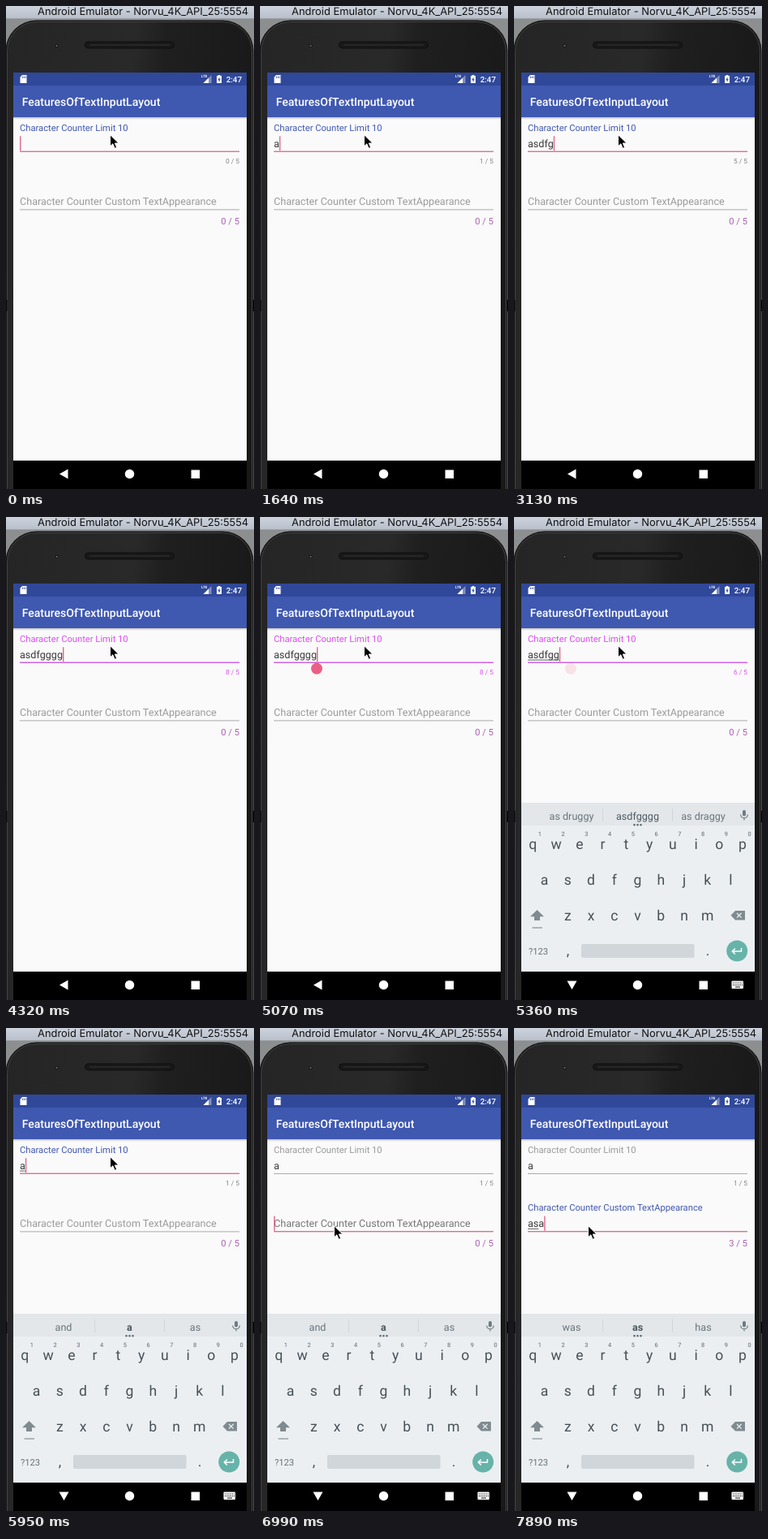
These frames come from a looping animation (306 by 595 pixels, 8 s). An HTML page:

```html
<!DOCTYPE html>
<html lang="en">
<head>
<meta charset="utf-8">
<title>Text input counters</title>
<style>
html, body { margin: 0; width: 100%; height: 100%; overflow: hidden; background: #222; }
svg { display: block; width: 306px; height: 595px; }
text { font-family: Roboto, sans-serif; text-rendering: geometricPrecision; white-space: pre; }
.mid { text-anchor: middle; }
.end { text-anchor: end; }
.body { font-size: 12.6px; fill: #3a3a3a; }
.label { font-size: 11.2px; }
.key { font-size: 17.6px; fill: #465158; }
.digit { font-size: 7.4px; fill: #5a666d; }
.word { font-size: 12.6px; fill: #68757c; }
</style>
</head>
<body>
<svg viewBox="0 0 306 595" xmlns="http://www.w3.org/2000/svg">
  <defs>
    <linearGradient id="bar" x2="0" y2="1"><stop stop-color="#cdd3dd"/><stop offset="1" stop-color="#b9c0cb"/></linearGradient>
    <linearGradient id="shell" x2="1" y2=".25"><stop stop-color="#252525"/><stop offset=".5" stop-color="#292929"/><stop offset=".62" stop-color="#1f1f1f"/><stop offset="1" stop-color="#191919"/></linearGradient>
    <linearGradient id="shade" x2="0" y2="1"><stop stop-color="#000" stop-opacity=".22"/><stop offset="1" stop-color="#000" stop-opacity="0"/></linearGradient>
    <clipPath id="screen"><path d="M9 82H297V595H9Z"/></clipPath>
  </defs>

  <!-- window and phone shell -->
  <path fill="#8c8e8f" d="M0 0H306V595H0Z"/>
  <path fill="url(#bar)" d="M0 0H306V15H0Z"/>
  <path fill="#9da2a8" d="M0 15H306V16H0Z"/>
  <text x="39" y="11" style="font:12.9px Inter,sans-serif" fill="#111">Android Emulator - Norvu_4K_API_25:5554</text>
  <rect x="-.5" y="17.5" width="306" height="640" rx="38" fill="#141414"/>
  <rect x="1.5" y="19.5" width="302" height="640" rx="36" fill="url(#shell)" stroke="#444"/>
  <path fill="#080808" d="M0 362H1.5V376H0ZM304.5 362H306V376H304.5Z"/>
  <rect x="97.5" y="44" width="110" height="8" rx="4" fill="#181818" stroke="#0e0e0e"/>
  <path d="M103 48H202" stroke="#262626" stroke-width="2"/>
  <circle cx="62.5" cy="49" r="2.2" fill="#181818"/><circle cx="62.5" cy="49" r="1" fill="#777"/>

  <g clip-path="url(#screen)">
    <path fill="#fafafa" d="M9 82H297V595H9Z"/>
    <path fill="#3f58b0" d="M9 98H297V137H9Z"/>
    <path fill="#304899" d="M9 82H297V98H9Z"/>
    <path fill="url(#shade)" d="M9 137H297V140H9Z"/>
    <text x="19.7" y="123" font-size="14" font-weight="500" fill="#fff">FeaturesOfTextInputLayout</text>

    <!-- status icons -->
    <path fill="#fff" d="M20 85H25.5V95H17.5V87.7Z"/>
    <path stroke="#304899" d="M20.5 86.5V89M22.3 86.5V89M24.1 86.5V89" stroke-width=".8"/>
    <text x="241" y="88" font-size="4.4" font-weight="700" fill="#fff">LTE</text>
    <path fill="#fff" fill-opacity=".4" d="M253.5 85V95H243.5Z"/>
    <path fill="#fff" d="M250 88.5V95H243.5Z"/>
    <path fill="#fff" d="M260 86H261.7V85H264.3V86H266V95H260Z"/>
    <path fill="#304899" d="M263.5 87.5L261.3 91.3H262.7V93.8L264.8 90.2H263.5Z"/>
    <text class="end" x="291" y="94" font-size="9.8" font-weight="500" fill="#fff">2:47</text>

    <g id="fields"></g>
    <path fill="#000" d="M9 560H297V595H9Z"/>

    <g id="keyboard">
      <path fill="#eceff1" d="M9 352H297V560H9Z"/>
      <path fill="#e3e7ea" d="M9 352H297V380H9Z"/>
      <path stroke="#d0d6d9" d="M109.5 359V375M195.5 359V375"/>
      <g id="words"></g>
      <g id="dots" fill="#59666d"><circle cx="148.5" cy="379.3" r="1.2"/><circle cx="152.5" cy="379.3" r="1.2"/><circle cx="156.5" cy="379.3" r="1.2"/></g>
      <rect x="282" y="361" width="4" height="7.5" rx="2" fill="#707c82"/>
      <path d="M279.7 366.5A4.3 4.3 0 0 0 288.3 366.5M284 371V373.5" fill="none" stroke="#707c82" stroke-width="1.2"/>
      <g id="keys"></g>
      <path fill="#7f8b91" d="M28.5 484L37 492.3H32V497H25V492.3H20Z"/>
      <path stroke="#8d989d" d="M22.5 506H35" stroke-width="1.3"/>
      <path fill="#7f8b91" d="M273 485H285V496.5H273L267.5 490.7Z"/>
      <path stroke="#eceff1" d="M275 488L280.6 493.6M280.6 488L275 493.6" stroke-width="1.3"/>
      <rect x="83" y="526" width="139.5" height="17" rx="2" fill="#d0d6d9"/>
      <circle cx="275.2" cy="534.5" r="13" fill="#67b3a9"/>
      <path fill="none" stroke="#fff" stroke-width="1.5" d="M280.5 531V535H269.5M272.8 531.6L269.3 535L272.8 538.4"/>
    </g>

    <g fill="#fff">
      <path id="back"/>
      <circle cx="152.5" cy="576.5" r="5.7"/>
      <path d="M228.5 571.5H239V582H228.5Z"/>
      <g id="switcher">
        <rect x="268.5" y="571.5" width="14.5" height="9.5" rx="1"/>
        <path stroke="#000" stroke-width="1.2" stroke-dasharray="1.2 1" d="M270 574H282M270 576.5H282"/>
        <path stroke="#000" d="M273 579H279"/>
      </g>
    </g>
  </g>
  <path id="mouse" fill="#000" stroke="#fff" stroke-width="1" stroke-linejoin="round"
        d="M.5 .5V14.5L3.8 11.5L6.2 17L8.7 16L6.3 10.7H11Z"/>
</svg>

<script>
const LOOP = 8000;
const ACCENT = '#e3678a', BLUE = '#4158b2', OVER = '#db50ef', GRAY = '#9b9b9b', PURPLE = '#a964b1';
const LEFT = 17, RIGHT = 288, LIMIT = 5;
const $ = id => document.getElementById(id);

function add(parent, tag, attrs, content = '') {
  const el = document.createElementNS('http://www.w3.org/2000/svg', tag);
  set(el, attrs);
  el.textContent = content;
  return parent.appendChild(el);
}
function set(el, attrs) {
  for (const name in attrs) el.setAttribute(name, attrs[name]);
}
const show = (el, on) => set(el, { visibility: on ? 'visible' : 'hidden' });

function makeField(hint, base, lineY, countY, countSize) {
  const root = $('fields');
  return {
    base, lineY,
    label: add(root, 'text', { class: 'label', x: LEFT }, hint),
    line: add(root, 'rect', { x: LEFT, width: RIGHT - LEFT }),
    count: add(root, 'text', { class: 'end', x: RIGHT, y: countY, 'font-size': countSize }),
    value: add(root, 'text', { class: 'body', x: LEFT, y: base }),
    mark: add(root, 'rect', { x: LEFT, y: base + 1.8, height: 1, fill: '#666' }),
    caret: add(root, 'rect', { y: base - 13.5, width: 1.4, height: 18, fill: ACCENT })
  };
}
const first = makeField('Character Counter Limit 10', 173.8, 179, 193.6, 8.4);
const second = makeField('Character Counter Custom TextAppearance', 245.2, 250.4, 269, 11.2);
const handle = add($('fields'), 'path', { fill: '#ea5f85', d: 'M0 0L5 3A7 7 0 1 1 -5 3Z' });

// keyboard letters
const keys = $('keys');
[['qwertyuiop', 23.3, 408.8], ['asdfghjkl', 37.5, 452.8], ['zxcvbnm', 66.3, 496.8]].forEach(([row, x0, y], r) =>
  [...row].forEach((ch, i) => {
    const x = x0 + i * 28.75;
    add(keys, 'text', { class: 'key mid', x, y }, ch);
    if (!r) add(keys, 'text', { class: 'digit mid', x: x + 8.6, y: 393 }, (i + 1) % 10);
  }));
add(keys, 'text', { class: 'mid', x: 30, y: 538.5, 'font-size': 11.2, fill: '#66737a' }, '?123');
add(keys, 'text', { class: 'key mid', x: 66.5, y: 540 }, ',');
add(keys, 'text', { class: 'key mid', x: 239, y: 540 }, '.');
const words = [71, 152.5, 233.5].map(x => add($('words'), 'text', { class: 'word mid', x, y: 372.6 }));
words[1].style.fill = '#4c5960';

// each step changes only the listed parts of the state
const start = {
  a: '', b: '', focus: 1, caret: true, composing: 0, handle: 0,
  keyboard: 0, words: '||', dots: false, lift: 0, mouse: [128, 158.3]
};
const steps = [
  [0, {}],
  [150, { caret: false }],
  [590, { a: 'a', caret: true }],
  [1040, { caret: false }],
  [1640, { caret: true }],
  [2090, { a: 'as' }],
  [2380, { a: 'asd' }],
  [2830, { a: 'asdf' }],
  [3130, { a: 'asdfg' }],
  [3430, { a: 'asdfgg' }],
  [3730, { a: 'asdfggg' }],
  [4180, { a: 'asdfgggg' }],
  [4770, { caret: false }],
  [4920, { caret: true, handle: 1 }],
  [5210, { composing: 8, keyboard: .5 }],
  [5360, { a: 'asdfgg', handle: .15, keyboard: 1, words: 'as druggy|asdfgggg|as draggy', dots: true }],
  [5510, { a: 'asdf', handle: 0 }],
  [5650, { a: 'as', words: 'was|as|has' }],
  [5950, { a: 'a', words: 'and|a|as' }],
  [6400, { caret: false, mouse: [123, 170] }],
  [6550, { mouse: [103, 215] }],
  [6700, { mouse: [91, 243.3] }],
  [6990, { focus: 2, caret: true, composing: 0 }],
  [7140, { lift: .8, words: 'I|the|I’m', dots: false }],
  [7290, { lift: 1 }],
  [7590, { b: 'a', composing: 1, words: 'and|a|as', dots: true }],
  [7740, { b: 'as', composing: 2, words: 'was|as|has' }],
  [7890, { b: 'asa' }]
];

function drawField(f, text, focused, s, lift, countColor) {
  const over = text.length > LIMIT;
  const active = over ? OVER : BLUE;
  const rest = focused ? '#777' : GRAY;
  set(f.label, { y: f.base - lift * 19.8, fill: focused && lift > .5 ? active : rest });
  f.label.style.fontSize = 12.6 - lift * 1.4 + 'px';
  set(f.line, {
    y: f.lineY - (focused ? .4 : 0), height: focused ? 1.4 : 1,
    fill: over ? '#cd5be0' : focused ? '#dd7190' : '#aaa'
  });
  f.count.textContent = `${text.length} / ${LIMIT}`;
  set(f.count, { fill: over ? OVER : countColor });
  f.value.textContent = text;
  const widthOf = n => n ? f.value.getSubStringLength(0, n) : 0;
  set(f.mark, { width: focused ? widthOf(Math.min(s.composing, text.length)) : 0 });
  set(f.caret, { x: LEFT + widthOf(text.length) });
  show(f.caret, focused && s.caret);
}

function draw(time) {
  const s = Object.assign({}, start, ...steps.filter(([at]) => at <= time).map(([, change]) => change));
  drawField(first, s.a, s.focus === 1, s, 1, '#858585');
  drawField(second, s.b, s.focus === 2, s, s.lift, PURPLE);
  set(handle, { transform: 'translate(70 178.8)', opacity: s.handle });
  set($('keyboard'), { opacity: s.keyboard, transform: `translate(0 ${(1 - s.keyboard) * 98})` });
  s.words.split('|').forEach((word, i) => { words[i].textContent = word; });
  words[1].style.fontWeight = s.words.split('|')[1].length < 3 ? 700 : 400;
  show($('dots'), s.dots);
  show($('switcher'), s.keyboard > 0);
  set($('back'), { d: s.keyboard ? 'M65.5 571.5H77.5L71.5 582Z' : 'M76.5 570.5V582.5L66 576.5Z' });
  set($('mouse'), { transform: `translate(${s.mouse})` });
}

const begin = performance.now();
function tick() {
  draw((performance.now() - begin) % LOOP);
  requestAnimationFrame(tick);
}
tick();
</script>
</body>
</html>
```
